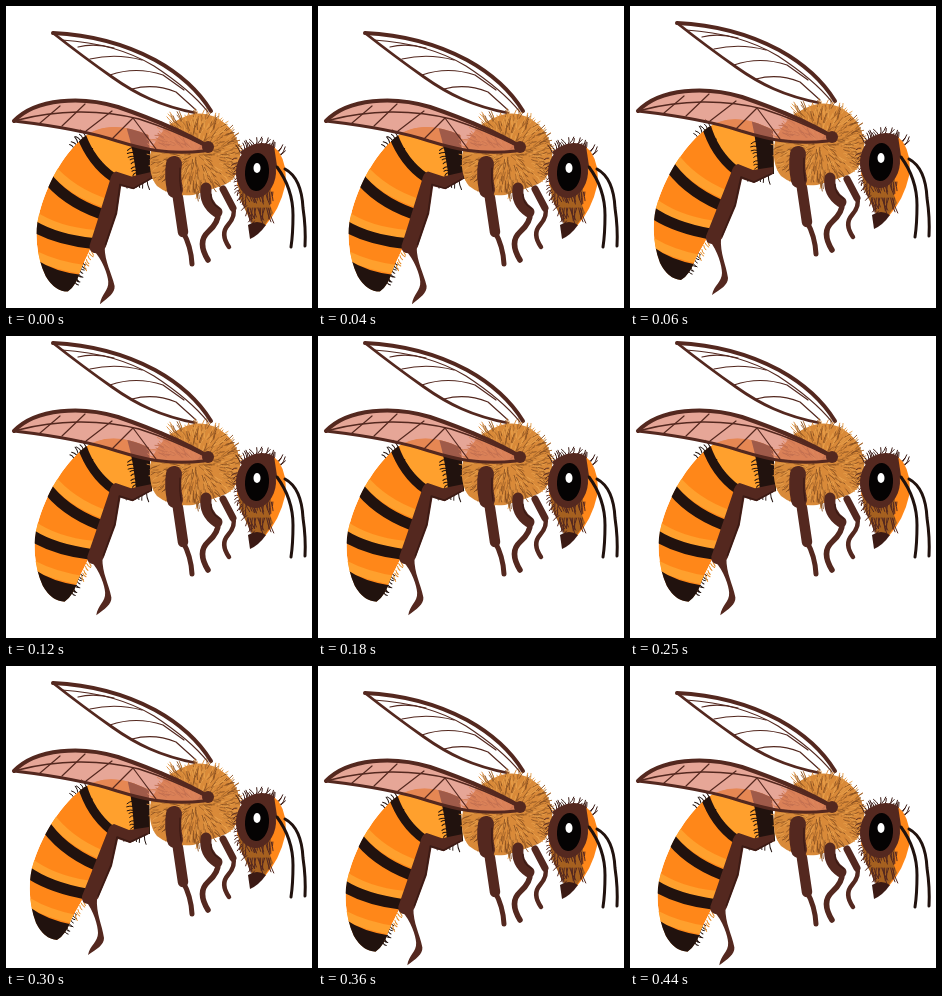
An HTML page with a canvas for the animation above (0.49 s loop, 306x302 px).

```html
<!DOCTYPE html>
<html lang="en">
<head>
<meta charset="utf-8">
<title>Bee</title>
<style>
html, body { margin: 0; width: 100%; height: 100%; overflow: hidden; background: #fff; }
canvas { display: block; width: 306px; height: 302px; }
</style>
</head>
<body>
<canvas id="bee"></canvas>
<script>
const W = 306, H = 302, LOOP = 490;
const BROWN = '#54281f', SHADE = '#3b1a14', BLACK = '#21120e';
const ORANGE = '#ff8719', LIGHT = '#ffa02d';
const canvas = document.getElementById('bee');
const ctx = canvas.getContext('2d');
const dpr = window.devicePixelRatio || 1;
canvas.width = W * dpr;
canvas.height = H * dpr;

// Body lift, then the swing and offset of the abdomen with its hind leg
const LOW = { y: 0, turn: -0.075, dx: 1, dy: -4 };
const MID = { y: -10, turn: 0, dx: 0, dy: 0 };
const HIGH = { y: -20, turn: -0.05, dx: 1, dy: -2 };
const REST = { y: 0, turn: -0.05, dx: 0, dy: -2 };
const STEPS = [[60, LOW], [120, MID], [300, HIGH], [360, MID], [LOOP, REST]];

function seeded(seed) {
  return () => (seed = (seed * 16807) % 2147483647) / 2147483647;
}

function fill(d, color) {
  ctx.fillStyle = color;
  ctx.fill(new Path2D(d));
}

function line(d, color, width) {
  ctx.strokeStyle = color;
  ctx.lineWidth = width;
  ctx.stroke(new Path2D(d));
}

function oval(x, y, rx, ry, color, turn = 0) {
  ctx.fillStyle = color;
  ctx.beginPath();
  ctx.ellipse(x, y, rx, ry, turn, 0, Math.PI * 2);
  ctx.fill();
}

function hair(x, y, angle, length, bend) {
  const c = Math.cos(angle), s = Math.sin(angle);
  ctx.moveTo(x, y);
  ctx.quadraticCurveTo(x + c * length / 2 - s * bend, y + s * length / 2 + c * bend,
    x + c * length, y + s * length);
}

// Hairs along a straight edge, pointing in one direction
function fringe(x1, y1, x2, y2, count, angle, length, color, seed) {
  const rnd = seeded(seed);
  ctx.strokeStyle = color;
  ctx.lineWidth = 1;
  ctx.beginPath();
  for (let i = 0; i < count; i++) {
    const k = (i + rnd() * 0.6) / count;
    hair(x1 + (x2 - x1) * k, y1 + (y2 - y1) * k,
      angle + rnd() * 0.8 - 0.4, length * (0.6 + rnd() * 0.5), 1);
  }
  ctx.stroke();
}

function backWing() {
  line('M56 34C88 36 120 43 148 60C174 77 190 91 202 106', BROWN, 1.2);
  line('M72 41Q88 37 108 42M84 53Q110 47 136 54M104 69Q130 60 157 69L178 84M126 83Q148 77 170 86L190 104', BROWN, 1.2);
  line('M47 27C66 42 86 57 106 71C130 88 154 100 190 107', BROWN, 2.8);
  line('M47 27C88 29 119 38 149 54C178 70 194 87 205 105', BROWN, 4);
}

const ABDOMEN = 'M143 134C118 121 96 119 77 132C56 148 38 175 28 205C22 222 22 246 30 267Q38 283 51 284Q60 279 66 262L80 237L108 176L144 178Z';

function abdomen() {
  fringe(80, 130, 66, 142, 6, -2.3, 8, BLACK, 5);
  fringe(112, 176, 140, 180, 9, 1.6, 9, BLACK, 8);
  fringe(68, 256, 58, 278, 9, 0.8, 6, BLACK, 12);
  fringe(80, 236, 68, 262, 8, 0.9, 7, '#e58a22', 22);
  ctx.save();
  ctx.clip(new Path2D(ABDOMEN));
  fill(ABDOMEN, ORANGE);
  fill('M82 110H145V182H106Q86 158 82 130Z', LIGHT);
  line('M43 159Q62 185 96 199', LIGHT, 9);
  line('M22 205Q44 223 82 229', LIGHT, 9);
  line('M22 246Q42 258 72 264', LIGHT, 9);
  line('M76 129Q84 157 105 174', BLACK, 9);
  line('M37 166Q54 193 90 209', BLACK, 11);
  line('M20 215Q42 231 80 238', BLACK, 11);
  fill('M22 250Q40 264 68 269L55 290H28Z', BLACK);
  fill('M121 122L143 132L146 182H128Q128 150 121 122Z', BLACK);
  ctx.restore();
  fringe(127, 145, 128, 174, 8, 2.8, 6, BLACK, 41);
  fringe(78, 137, 100, 172, 8, 0.3, 6, BLACK, 44);
}

function hindLeg() {
  fill('M79 244C88 255 92 270 92 277C92 286 84 289 82 299C91 293 98 289 98 282C96 268 90 258 91 242Z', BROWN);
  fill('M143 171L123 174L108 168Q103 169 101 177L84 220L76 240Q75 247 82 248Q91 248 94 238L106 210L112 183L124 187L143 178Z', BROWN);
  line('M141 178L124 186L111 181L105 209L92 240', SHADE, 1.5);
}

function thorax() {
  const rnd = seeded(73);
  const shape = 'M145 145Q154 121 176 112Q193 103 211 112Q231 123 234 146Q235 170 220 178Q202 185 187 189Q164 191 151 180Q141 168 145 145Z';
  fill(shape, '#d98a39');
  const tones = ['#8a5122', '#e7a04b', '#a5652a', '#d98a39'];
  for (let i = 0; i < 520; i++) {
    const a = rnd() * Math.PI * 2, r = Math.sqrt(rnd());
    ctx.beginPath();
    hair(189 + Math.cos(a) * 42 * r, 148 + Math.sin(a) * 38 * r,
      a + rnd() * 0.8 - 0.4, 5 + rnd() * 5, rnd() * 3 - 1.5);
    ctx.strokeStyle = tones[i % 4];
    ctx.lineWidth = 0.9;
    ctx.stroke();
  }
}

function legs() {
  line('M217 183L227 202', BROWN, 7);
  line('M227 201Q230 210 222 219T223 241', BROWN, 4.5);
  line('M200 182Q198 197 211 206', BROWN, 11);
  line('M212 207Q213 216 202 226T202 254', BROWN, 5.5);
  line('M205 188Q204 197 214 203', SHADE, 1.2);
  line('M177 226Q185 240 186 258', BROWN, 5);
  line('M172 192L177 226', BROWN, 10.5);
  line('M168 158Q166 170 169 184', BROWN, 16);
  line('M174 162Q173 174 175 185', SHADE, 1.2);
}

function frontWing() {
  const shape = 'M8 115C30 92 76 90 112 101C147 113 176 125 204 140Q207 145 198 146C161 149 137 143 111 135C78 124 42 119 8 115Z';
  ctx.globalAlpha = 0.68;
  fill(shape, '#da7d66');
  ctx.globalAlpha = 1;
  line('M12 114C50 104 94 103 133 113Q167 124 199 140', BROWN, 1.5);
  line('M34 117L54 100M56 120L79 98M80 125L106 105M106 133L127 112M127 112L150 143', BROWN, 1.2);
  line('M8 115C42 119 78 124 111 135C137 143 161 149 198 145', BROWN, 3);
  line('M8 115C30 92 76 90 112 101C147 113 176 125 203 141', BROWN, 4);
  oval(202, 141, 6, 6, BROWN);
}

function head() {
  fringe(234, 146, 252, 138, 9, -1.9, 8, SHADE, 17);
  fringe(252, 137, 277, 150, 13, -1, 9, SHADE, 19);
  fringe(231, 152, 233, 186, 9, 2.8, 6, BROWN, 27);
  fill('M241 142Q262 132 273 146Q282 160 279 180Q274 203 259 220L246 210L231 178Z', ORANGE);
  fill('M234 146Q252 132 268 140L271 160L250 170Z', BROWN);
  fill('M232 177Q247 196 265 182L264 199L267 207L258 220L246 218L234 193Z', '#a5601f');
  fringe(232, 181, 249, 216, 16, 2.1, 7, BROWN, 53);
  fringe(237, 186, 268, 186, 18, 1.4, 13, BROWN, 66);
  fringe(242, 202, 265, 202, 13, 1.5, 15, BROWN, 79);
  oval(250, 166, 20, 26, BROWN, 0.06);
  oval(251, 166, 12, 19, '#050303', 0.06);
  oval(251, 162, 3.5, 5, '#fff');
  fill('M242 219Q251 213 260 219Q253 229 244 233Z', SHADE);
  line('M271 161C282 176 287 192 287 209Q287 228 285 241', BLACK, 3);
  line('M279 163C290 169 296 182 297 202Q300 222 299 240', BLACK, 3);
}

function draw(pose) {
  ctx.setTransform(dpr, 0, 0, dpr, 0, 0);
  ctx.fillStyle = '#fff';
  ctx.fillRect(0, 0, W, H);
  ctx.lineCap = ctx.lineJoin = 'round';
  ctx.translate(0, pose.y);
  backWing();
  ctx.save();
  ctx.translate(130 + pose.dx, 155 + pose.dy);
  ctx.rotate(pose.turn);
  ctx.translate(-130, -155);
  abdomen();
  hindLeg();
  ctx.restore();
  thorax();
  legs();
  frontWing();
  head();
}

let shown;
function tick() {
  const t = performance.now() % LOOP;
  const pose = STEPS.find(([end]) => t < end)[1];
  if (pose !== shown) draw(shown = pose);
  requestAnimationFrame(tick);
}
tick();
</script>
</body>
</html>
```
